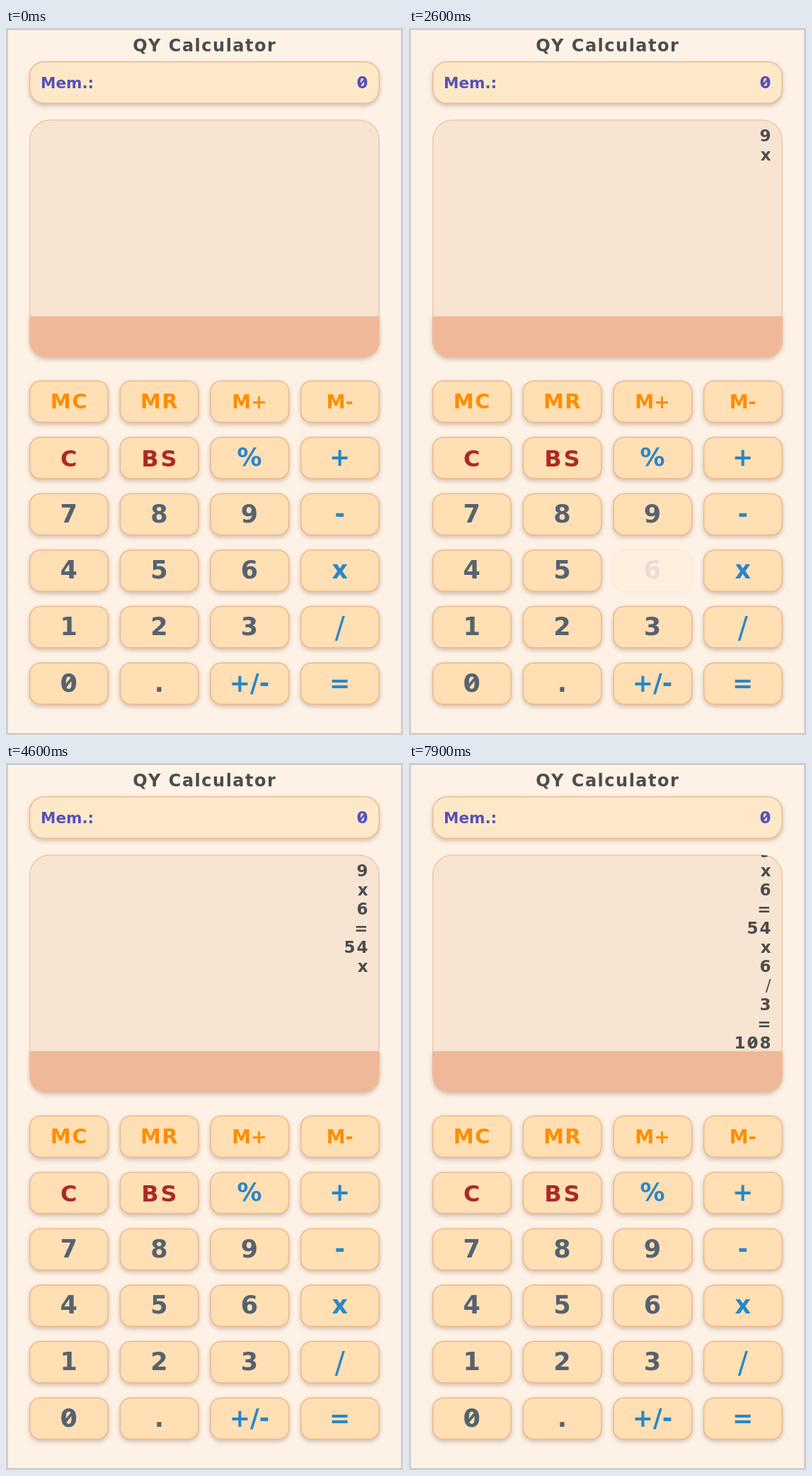
An HTML page for the animation above (8000 ms loop, 561 by 998 pixels).

```html
<!DOCTYPE html>
<html lang="en">
<head>
<meta charset="utf-8">
<title>QY Calculator</title>
<style>
  html, body { margin: 0; width: 100%; height: 100%; overflow: hidden; background: #fef2e6; }
  svg { display: block; width: 561px; height: 998px; }
  text { font-family: "DejaVu Sans", Verdana, sans-serif; font-weight: 700; white-space: pre; fill: currentColor; }
  line { stroke: currentColor; }
  .frame { fill: #fef2e6; stroke: #cfcfcf; stroke-width: 3; }
  .raised { filter: drop-shadow(0 3px 3px rgba(90, 60, 40, .28)); }
  .memory { fill: #fde9c8; stroke: #efb994; stroke-width: 1.5; }
  .paper { fill: #f8e4d3; stroke: #f1c6a3; stroke-width: 1.5; }
  .strip { fill: #efb999; }
  .key { fill: #ffdfb3; stroke: #ecb890; stroke-width: 1.5; }
  .ink { color: #4d4d4d; }
  .mem { color: #5551b8; }
  .store { color: #ff8d00; }
  .clear { color: #ad2a24; }
  .op { color: #2a86c8; }
  .digit { color: #566270; }
  .thin { font-weight: 400; }
</style>
</head>
<body>
<svg id="stage" viewBox="0 0 561 998">
  <defs>
    <clipPath id="window"><path d="M34 407V157a27 27 0 0 1 27-27H500a27 27 0 0 1 27 27V407Z"/></clipPath>
  </defs>
  <rect class="frame" x="1.5" y="1.5" width="558" height="995"/>
  <rect class="memory raised" x="33.7" y="47.7" width="493.6" height="58.6" rx="20"/>
  <path class="paper" d="M33.7 408V158a28 28 0 0 1 28-28H499.3a28 28 0 0 1 28 28V408"/>
  <g id="history" clip-path="url(#window)"></g>
  <path class="strip raised" d="M33 407H528V441a24 24 0 0 1-24 24H57a24 24 0 0 1-24-24Z"/>
  <g id="entry"></g>
  <g id="keys"></g>
</svg>
<script>
const LOOP = 8000, STEP = 100, ROW = 27;
const find = id => document.getElementById(id);
const stage = find('stage'), historyBox = find('history'), entryBox = find('entry');

function add(parent, tag, attrs) {
  const el = document.createElementNS('http://www.w3.org/2000/svg', tag);
  for (const name in attrs) el.setAttribute(name, attrs[name]);
  return parent.appendChild(el);
}

// Text with a slash laid through each zero; the spacing after the last letter is not counted
function label(parent, str, x, y, size, cls, anchor, spacing = 0) {
  const trail = { start: 0, middle: spacing / 2, end: spacing }[anchor];
  const el = add(parent, 'text', {
    x: x + trail, y, 'font-size': size, class: cls, 'text-anchor': anchor, 'letter-spacing': spacing
  });
  el.textContent = str;
  [...str].forEach((ch, i) => {
    if (ch !== '0') return;
    const left = el.getStartPositionOfChar(i).x;
    const cx = left + size * .348, cy = y - size * .365;
    add(parent, 'line', {
      x1: cx - size * .2, y1: cy + size * .24, x2: cx + size * .2, y2: cy - size * .24,
      class: cls, 'stroke-width': size * .11
    });
  });
}

label(stage, 'QY Calculator', 280, 33, 24, 'ink', 'middle', 1.5);
label(stage, 'Mem.:', 49, 85, 21.5, 'mem', 'start');
label(stage, '0', 511.5, 85, 23, 'mem', 'end');

const layout = ['MC MR M+ M-', 'C BS % +', '7 8 9 -', '4 5 6 x', '1 2 3 /', '0 . +/- ='];
const keys = {};

// Class, font size, baseline below the key's top, letter spacing
function style(name) {
  if (/^M[CR]/.test(name)) return ['store', 29, 39.5, 1.5];
  if (/^M/.test(name)) return ['store', 27, 39, 0];
  if (/^(C|BS)$/.test(name)) return ['clear', 32, 41.5, 3];
  if (name === '/') return ['op thin', 42, 45, 0];
  return [/[\d.]/.test(name) ? 'digit' : 'op', 35, 41, 0];
}

layout.forEach((line, r) => line.split(' ').forEach((name, c) => {
  const x = 33.7 + c * 127.67, y = 498.2 + r * 79.6;
  const g = keys[name] = add(find('keys'), 'g', {});
  const [cls, size, drop, spacing] = style(name);
  add(g, 'rect', { class: 'key raised', x, y, width: 110.6, height: 58.2, rx: 15 });
  label(g, name, x + 55, y - .7 + drop, size, cls, 'middle', spacing);
}));

// Opacity of a pressed key, one value per step
const soft = [.55, .13, .45, .8], held = [.17, .17, .27, .65];
const presses = [
  ['9', 1000, soft], ['x', 1600, soft], ['6', 2500, soft], ['=', 3400, held], ['x', 4200, soft],
  ['6', 4900, soft], ['/', 6000, held], ['3', 6700, held], ['=', 7500, held]
];

// Each state: start time, printed history, current entry
const states = [
  [0, '', ''],
  [1200, '', '9'],
  [1800, '9 x', ''],
  [2700, '9 x', '6'],
  [3600, '9 x 6 = 54', ''],
  [4400, '9 x 6 = 54 x', ''],
  [5100, '9 x 6 = 54 x', '6'],
  [6200, '9 x 6 = 54 x 6 /', ''],
  [6900, '9 x 6 = 54 x 6 /', '3'],
  [7700, '9 x 6 = 54 x 6 / 3 = 108', '']
];
let shown;

function print([, history, entry]) {
  historyBox.replaceChildren();
  entryBox.replaceChildren();
  const rows = history.split(' ');
  const scroll = Math.max(0, rows.length - 10) * ROW;
  rows.forEach((row, i) =>
    label(historyBox, row, 511.5, 159.5 + i * ROW - scroll, 23, row === '/' ? 'ink thin' : 'ink', 'end', 2));
  label(entryBox, entry, 511.5, 445.5, 27, 'ink', 'end');
}

function draw(now) {
  const t = Math.floor(now % LOOP / STEP) * STEP;
  const state = states.filter(s => s[0] <= t).pop();
  if (state !== shown) print(shown = state);
  for (const name in keys) keys[name].style.opacity = 1;
  for (const [name, start, curve] of presses) {
    const alpha = curve[(t - start) / STEP];
    if (alpha) keys[name].style.opacity = alpha;
  }
}

const begin = performance.now();
function tick() {
  draw(performance.now() - begin);
  requestAnimationFrame(tick);
}
tick();
</script>
</body>
</html>
```
